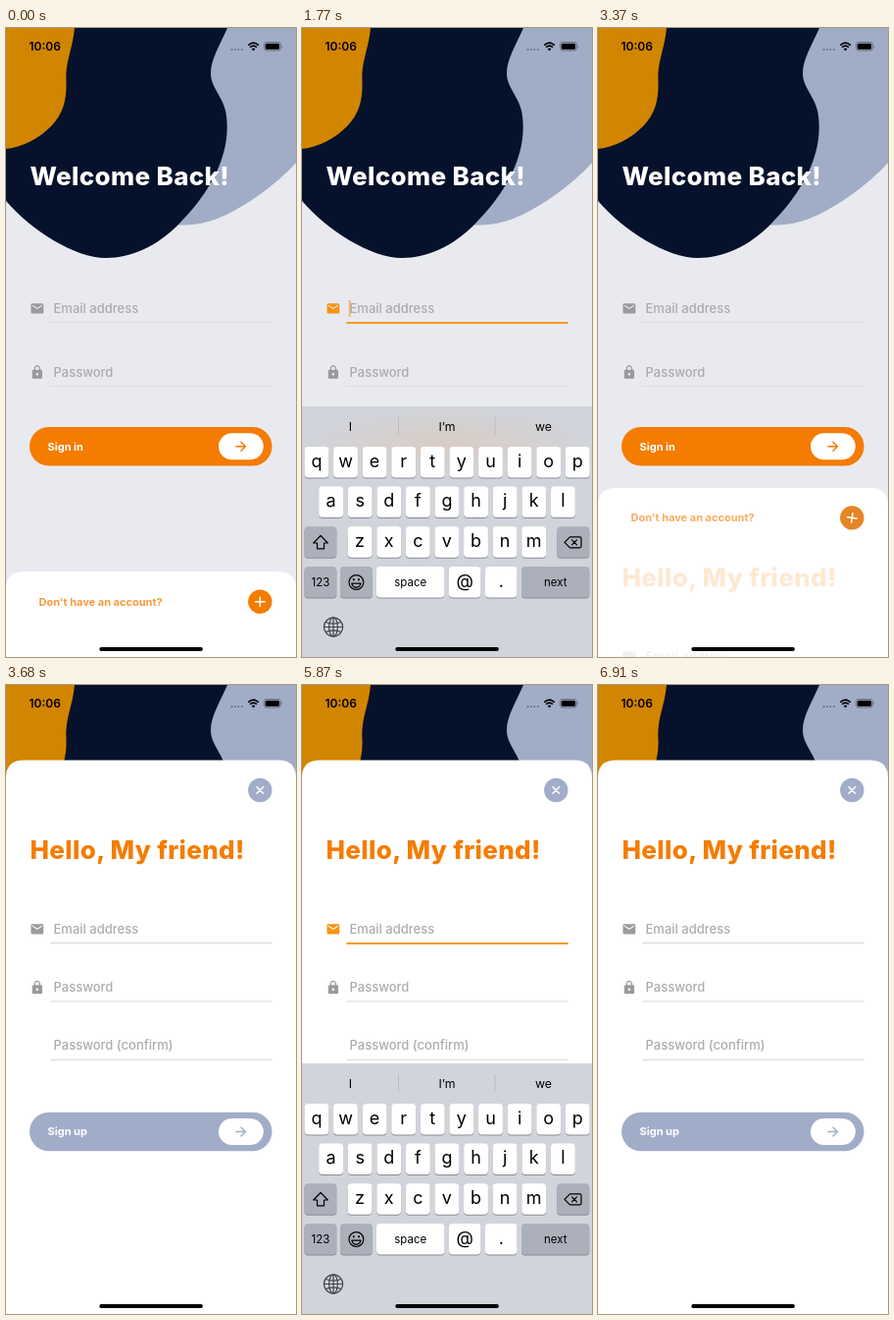
Animation, 296 px wide and 640 px high, one loop 8 s. Source, as an HTML page:

```html
<!DOCTYPE html>
<html lang="en">
<head>
<meta charset="utf-8">
<title>Sign in and sign up</title>
<style>
  html, body { margin: 0; width: 100%; height: 100%; overflow: hidden; background: #e9eaef; }
  svg { display: block; width: 100%; height: 100%; font-family: Inter, Roboto, sans-serif; }
  .title { font-size: 26px; font-weight: 800; letter-spacing: .35px; }
  .label { font-size: 11px; font-weight: 700; }
  .hint { font-size: 13px; font-weight: 500; fill: #acacae; }
  .clock { font-size: 12px; font-weight: 600; }
  .letter { font-size: 18px; text-anchor: middle; }
  .word { font-size: 11.5px; text-anchor: middle; }
  .suggestion { font-size: 12.3px; text-anchor: middle; }
  .stroke { fill: none; stroke: currentColor; stroke-linecap: round; stroke-linejoin: round; }
</style>
</head>
<body>
<svg viewBox="0 0 296 640" preserveAspectRatio="none">
  <defs>
    <radialGradient id="glow">
      <stop offset="0" stop-color="#f5b070" stop-opacity=".22"/>
      <stop offset="1" stop-color="#f5b070" stop-opacity="0"/>
    </radialGradient>
  </defs>
  <rect width="296" height="640" fill="#e9eaef"/>
  <path fill="#a1adc6" d="M200 0H296V137C282 153 255 175 225 190C208 198 190 202 172 200Z"/>
  <path fill="#06122b" d="M0 0H226C218 18 209 32 209 46C209 60 220 68 224 84C229 108 226 150 176 200C154 222 128 234 102 234C70 234 26 206 0 176Z"/>
  <path fill="#d28500" d="M0 0H70C68 22 60 34 61.5 56C62 73 58 88 46 100C34 112 18 121 0 123Z"/>
  <text class="title" x="24.5" y="159.5" fill="#fff">Welcome Back!</text>
  <g id="login"></g>

  <g id="sheet">
    <path fill="#fff" d="M0 700V94.5Q0 76.6 18 76.6H278Q296 76.6 296 94.5V700Z"/>
    <text class="label" id="prompt" x="33.5" y="111" fill="#f79a3e">Don't have an account?</text>
    <g transform="translate(259.3 107)" color="#fff">
      <circle id="toggle" r="12.2"/>
      <path id="cross" class="stroke" stroke-width="1.5" d="M-4.7 0H4.7M0 -4.7V4.7"/>
    </g>
    <g id="signup"></g>
  </g>

  <g id="keyboard"></g>

  <text class="clock" x="23.5" y="23">10:06</text>
  <g id="status">
    <path stroke="#000" stroke-opacity=".35" stroke-width="2" stroke-linecap="round" stroke-dasharray="0 3.4" d="M230.5 22H242"/>
    <path class="stroke" stroke-width="1.7" style="stroke-linecap:butt" d="M247.2 17.6Q252.5 12.6 257.8 17.6M249.1 19.7Q252.5 16.6 255.9 19.7"/>
    <path d="M250.6 21.2Q252.5 19.6 254.4 21.2L252.5 23.2Z"/>
    <rect x="263.4" y="14.4" width="17" height="8.6" rx="2.6" fill="none" stroke="#000" stroke-opacity=".45" stroke-width=".8"/>
    <rect x="264.7" y="15.7" width="14.4" height="6" rx="1.5"/>
    <path d="M281.6 17.2Q283 18.7 281.6 20.2Z" fill-opacity=".5"/>
  </g>
  <rect x="95.3" y="630.1" width="105.6" height="3.9" rx="1.95"/>
</svg>

<script>
const LOOP = 8000;
const ORANGE = [245, 148, 20], GRAY = [154, 154, 156];
const $ = id => document.getElementById(id);

const ICONS = {
  mail: 'M20 4H4c-1.1 0-2 .9-2 2v12c0 1.1.9 2 2 2h16c1.1 0 2-.9 2-2V6c0-1.1-.9-2-2-2zm0 4l-8 5-8-5V6l8 5 8-5v2z',
  lock: 'M18 8h-1V6c0-2.76-2.24-5-5-5S7 3.24 7 6v2H6c-1.1 0-2 .9-2 2v10c0 1.1.9 2 2 2h12c1.1 0 2-.9 2-2V10c0-1.1-.9-2-2-2zm-6 9c-1.1 0-2-.9-2-2s.9-2 2-2 2 .9 2 2-.9 2-2 2zm3.1-9H8.9V6c0-1.71 1.39-3.1 3.1-3.1s3.1 1.39 3.1 3.1v2z'
};

const text = (cls, x, y, s) => `<text class="${cls}" x="${x}" y="${y}">${s}</text>`;

function field(y, hint, icon, lineColor) {
  const mark = icon
    ? `<path class="icon" fill="rgb(${GRAY})" transform="translate(24.2 ${y - 7.3}) scale(.64)" d="${ICONS[icon]}"/>`
    : '';
  return mark + text('hint', 48.5, y + 4.5, hint) +
    `<path stroke="${lineColor}" d="M45.5 ${y + 14.5}H271.5"/>`;
}

function focusMarks(y) {
  return `<rect class="underline" x="45.5" y="${y + 14}" height="2" fill="#f59a1c"/>
    <rect class="cursor" x="47.8" y="${y - 8}" width="1.8" height="17" fill="#f58a10"/>`;
}

function button(y, label, color) {
  return `<rect x="24" y="${y}" width="247.5" height="39.5" rx="19.7" fill="${color}"/>
    <g fill="#fff">${text('label', 42.5, y + 23.7, label)}
    <rect x="217" y="${y + 6.3}" width="45.8" height="27" rx="13.5"/></g>
    <path class="stroke" color="${color}" stroke-width="1.4" d="M234.8 ${y + 19.8}h9.4m-4.3 -4.5l4.5 4.5l-4.5 4.5"/>`;
}

function key(x, y, width, label, cls = 'letter', fill = '#fff') {
  const rect = (top, color) =>
    `<rect x="${x}" y="${top}" width="${width}" height="31.5" rx="3.8" fill="${color}"/>`;
  const baseline = y + (cls === 'letter' ? 20.8 : 19.8);
  return rect(y + 1, '#8b8d93') + rect(y, fill) + text(cls, x + width / 2, baseline, label);
}

function letterRow(letters, x, y) {
  return [...letters].map((c, i) => key(x + i * 29.6, y, 24.8, c)).join('');
}

function keyboard() {
  const dark = '#abb0bb';
  return `<rect y="385" width="296" height="255" fill="#d1d4db"/>
    <ellipse id="tint" cx="148" cy="424" rx="150" ry="38" fill="url(#glow)"/>
    <path stroke="#babdc5" d="M98.5 396V414M197 396V414"/>` +
    text('suggestion', 49.3, 409.5, 'I') +
    text('suggestion', 148, 409.5, 'I’m') +
    text('suggestion', 246.5, 409.5, 'we') +
    letterRow('qwertyuiop', 2.5, 426) +
    letterRow('asdfghjkl', 17.2, 466.6) +
    letterRow('zxcvbnm', 46.7, 507.3) +
    key(2.5, 507.3, 32.8, '', 'word', dark) +
    key(260.3, 507.3, 33, '', 'word', dark) +
    key(2.5, 548, 32.8, '123', 'word', dark) +
    key(39, 548, 32.8, '', 'word', dark) +
    key(76, 548, 69.5, 'space', 'word') +
    key(150, 548, 32.5, '@') +
    key(187, 548, 32.5, '.') +
    key(224, 548, 69.3, 'next', 'word', dark) +
    `<g class="stroke" stroke-width="1.2">
      <path d="M19 516.5L26.3 524H22.5V529.8H15.5V524H11.7Z"/>
      <path d="M273.5 517.8H283.5Q285 517.8 285 519.3V527.3Q285 528.8 283.5 528.8H273.5L268 523.3ZM275.5 520.8L280.5 525.8M280.5 520.8L275.5 525.8"/>
      <circle cx="55.4" cy="564" r="7.4"/>
      <path d="M50.8 565.2H60Q59 569.2 55.4 569.2Q51.8 569.2 50.8 565.2Z"/>
      <path stroke-width="1.8" d="M52.8 560.8V561.6M58 560.8V561.6"/>
      <g color="#40444b"><circle cx="32" cy="609.5" r="9.6"/><ellipse cx="32" cy="609.5" rx="4.4" ry="9.6"/>
      <path d="M32 600V619M22.5 609.5H41.5M24.2 604.5Q32 607.8 39.8 604.5M24.2 614.5Q32 611.2 39.8 614.5"/></g>
    </g>`;
}

$('login').innerHTML = field(285, 'Email address', 'mail', '#dcdde2') + focusMarks(285) +
  field(350, 'Password', 'lock', '#dcdde2') + button(406, 'Sign in', '#f57c00');
$('signup').innerHTML = '<text class="title" x="24.5" y="177" fill="#f57c00">Hello, My friend!</text>' +
  field(248, 'Email address', 'mail', '#d6d6d8') + focusMarks(248) +
  field(307.4, 'Password', 'lock', '#d6d6d8') + field(366.8, 'Password (confirm)', '', '#d6d6d8') +
  button(434.7, 'Sign up', '#a1adc8');
$('keyboard').innerHTML = keyboard();

const ramp = (t, start, end) => Math.min(1, Math.max(0, (t - start) / (end - start)));
const easeOut = p => 1 - (1 - p) ** 3;
const smooth = p => p * p * (3 - 2 * p);
const mix = (a, b, p) => `rgb(${a.map((v, i) => Math.round(v + (b[i] - v) * p))})`;

// Each visit: keyboard rises, the cursor blinks once, the keyboard leaves.
const visits = [
  { form: $('login'), show: [490, 850], blinkOut: [1240, 1400], blinkIn: [1640, 1870], hide: [1865, 2290] },
  { form: $('signup'), show: [4945, 5370], blinkOut: [5710, 5870], blinkIn: [6230, 6460], hide: [6460, 6910] }
];

function updateForm({ form, show, blinkOut, blinkIn, hide }, t) {
  const [start, end] = show;
  const focus = smooth(ramp(t, start, start + (end - start) * .77)) *
    (1 - smooth(ramp(t, hide[0], hide[0] + 250)));
  const active = t >= start && t < hide[0];
  const find = cls => form.querySelector(cls);
  find('.underline').setAttribute('width', 226 * focus);
  find('.icon').setAttribute('fill', mix(GRAY, ORANGE, focus ** 1.5));
  find('.cursor').setAttribute('opacity', active ? 1 - ramp(t, ...blinkOut) + ramp(t, ...blinkIn) : 0);
  return easeOut(ramp(t, ...show)) - easeOut(ramp(t, ...hide));
}

function render(t) {
  const raised = visits.reduce((sum, visit) => sum + updateForm(visit, t), 0);
  $('keyboard').setAttribute('transform', `translate(0 ${256 * (1 - raised)})`);
  $('tint').setAttribute('opacity', t < 3000 ? 1 : 0);

  const open = easeOut(ramp(t, 3350, 3680));
  $('sheet').setAttribute('transform', `translate(0 ${476.7 * (1 - open)})`);
  $('prompt').setAttribute('opacity', 1 - open);
  $('signup').setAttribute('opacity', open);
  $('toggle').setAttribute('fill', mix([245, 124, 0], [161, 173, 200], open));
  $('cross').setAttribute('transform', `rotate(${45 * open})`);
}

const began = performance.now();
function frame() {
  render((performance.now() - began) % LOOP);
  requestAnimationFrame(frame);
}
frame();
</script>
</body>
</html>
```
